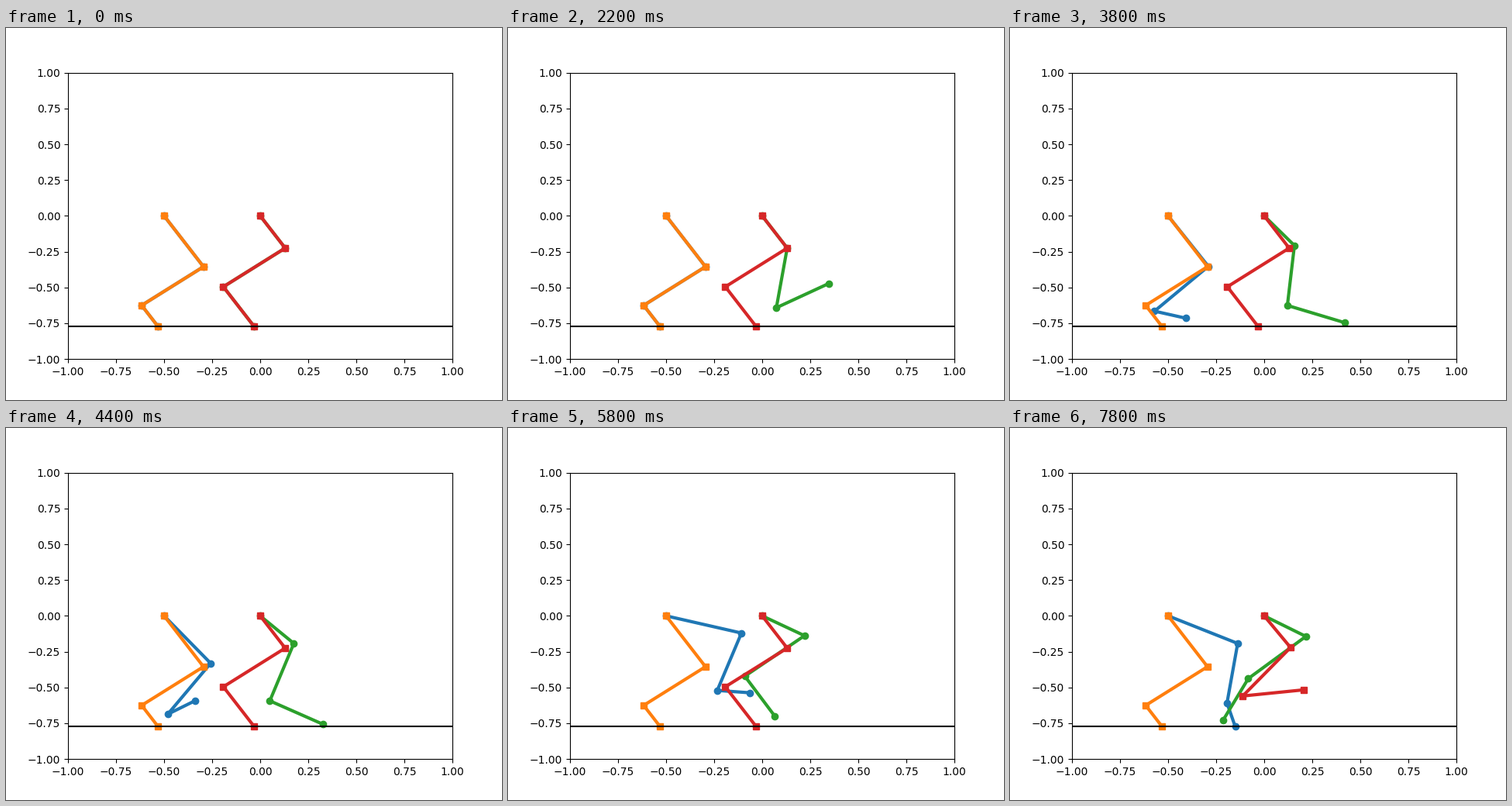
Animation of 640x480 px, one loop 8 s. Source, as a matplotlib script:

```python
import numpy as np
import matplotlib.pyplot as plt
from matplotlib.animation import FuncAnimation

FRAMES, STEP_MS = 40, 200
LAG = 16  # steps between the starts of successive legs

# Key poses: step: (hip, knee, ankle), degrees, each relative to the link above
STAND = (-60, -80, 80)
FRONT = {0: STAND, 6: (-58.2, -68.1, 134), 10: (-60, -37.7, 129.5),
         14: (-57.3, -30.5, 83.4), 21: (-47.7, -59.6, 76.7),
         25: (-38, -90, 83), 32: (-28, -115, 58.8), 38: (-33.5, -102, 21.2)}
REAR = {0: STAND, 5: (-53.8, -68.3, 155.6), 9: (-22.3, -100.4, 143.8),
        16: (-22.3, -63.6, 39.8), 22: (-28, -69.6, 22.2)}


def ease_through(poses, step):
    """Smooth cubic motion through the key poses, at rest before the first."""
    t = np.array(list(poses))
    q = np.array(list(poses.values()), float)
    slope = np.gradient(q, t, axis=0)
    step = np.clip(step, t[0], t[-1])
    i = min(np.searchsorted(t, step, side="right"), len(t) - 1) - 1
    span = t[i + 1] - t[i]
    u = (step - t[i]) / span
    blend = u * u * (3 - 2 * u)
    return (q[i] + blend * (q[i + 1] - q[i])
            + span * u * (1 - u) * ((1 - u) * slope[i] - u * slope[i + 1]))


class Leg:
    def __init__(self, ax, hip_x, links, poses, turn, marker):
        self.hip_x, self.links, self.poses = hip_x, links, poses
        self.start = 1 + turn * LAG
        self.line, = ax.plot([], [], lw=3, marker=marker)

    def move(self, step):
        angles = ease_through(self.poses, step - self.start)
        heading = np.radians(np.cumsum(angles))
        x = np.cumsum(self.links * np.cos(heading))
        y = np.cumsum(self.links * np.sin(heading))
        self.line.set_data(np.r_[0, x] + self.hip_x, np.r_[0, y])


fig, ax = plt.subplots(figsize=(6.4, 4.8), dpi=100)
ax.set_xlim(-1, 1)
ax.set_ylim(-1, 1)

rear, front = (0.41, 0.42, 0.17), (0.26, 0.42, 0.32)
legs = [
    Leg(ax, -0.5, rear, REAR, 1, "o"),
    Leg(ax, -0.5, rear, REAR, 3, "s"),
    Leg(ax, 0, front, FRONT, 0, "o"),
    Leg(ax, 0, front, FRONT, 2, "s"),
]

ground = np.sum(front * np.sin(np.radians(np.cumsum(STAND))))
ax.plot([-1, 1], [ground, ground], color="black")


def update(step):
    for leg in legs:
        leg.move(step)
    return [leg.line for leg in legs]


anim = FuncAnimation(fig, update, frames=FRAMES, interval=STEP_MS,
                     repeat=True, repeat_delay=0)
plt.show()
```
